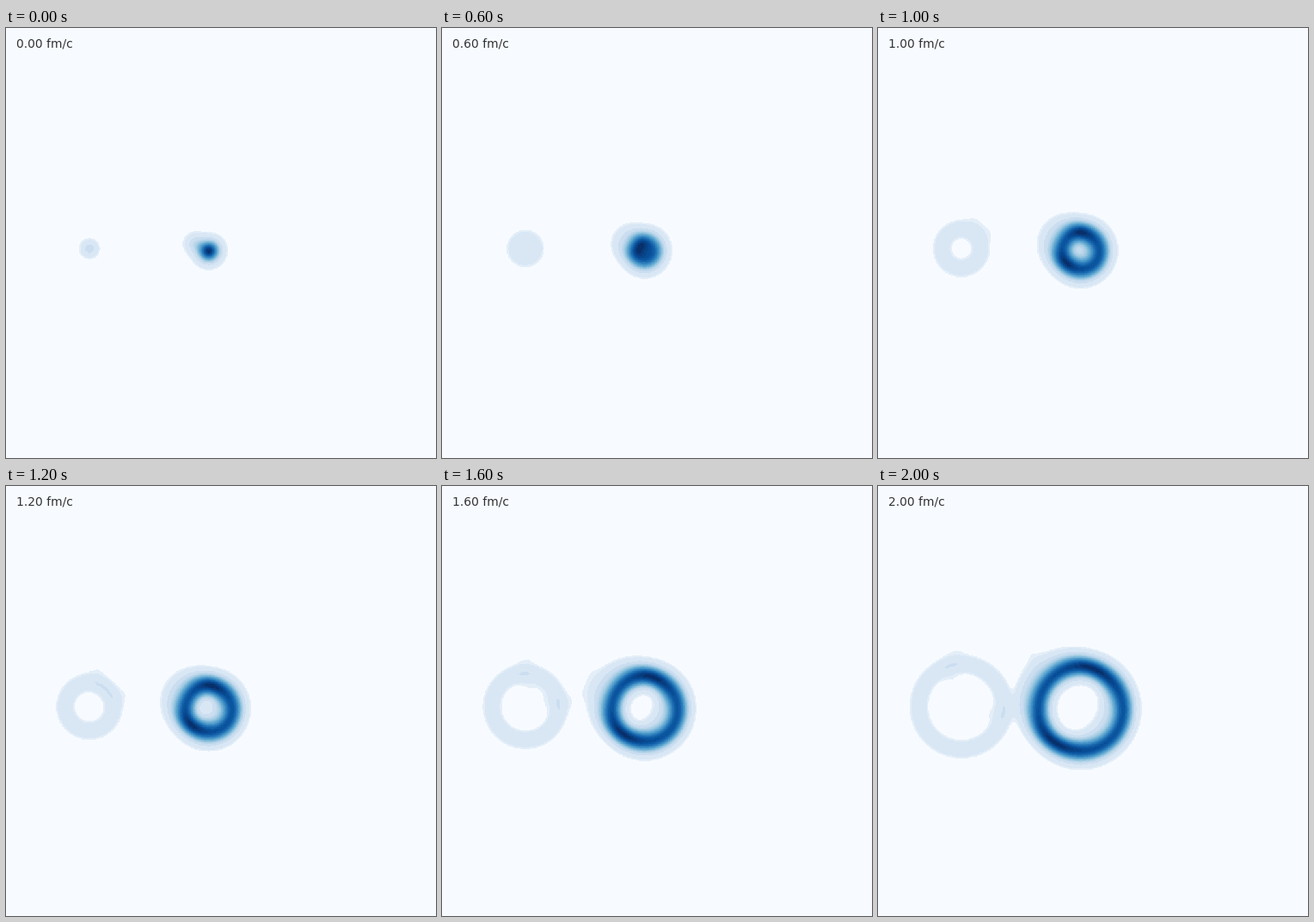
Animation of 500x500 px, one loop 2100 ms. Source, as a matplotlib script:

```python
import numpy as np
import matplotlib.pyplot as plt
from matplotlib.animation import FuncAnimation
from matplotlib.colors import BoundaryNorm, ListedColormap

SIZE = 500
CELLS = 200
FRAMES = 21
DT = 0.1          # fm/c per frame
SPEED = 26.75     # px per fm/c
LAG = 3.8         # px lost while the front builds up

# x, y, amplitude, width of each hot spot (px)
SPOTS = [
    (235.7, 259.8, 1.00, 8.3),
    (220.3, 251, 0.22, 7.4),
    (242, 254, 0.08, 7),
    (97, 256.5, 0.225, 6.2),
    (134, 215.5, 0.031, 8.3),
]

axis = (np.arange(CELLS) + 0.5) * SIZE / CELLS
X, Y = np.meshgrid(axis, axis)


def front(t):
    return np.hypot(SPEED * t, LAG) - LAG


def ring(x, y, amp, width, radius):
    """Gaussian spot smeared evenly around a circle."""
    r = np.hypot(X - x, Y - y)
    k = r * radius / width**2
    return amp * np.exp(-((r - radius) / width) ** 2 / 2) * np.i0(k) * np.exp(-k)


def density(t):
    radius = front(t)
    total = sum(ring(*spot, radius) for spot in SPOTS)
    return total / total.max()


# Coarse steps in the pale range, fine ones above
bounds = np.r_[0, 0.03, 0.05, 0.153, np.linspace(0.24, 1.0001, 25)]
shades = np.r_[0, 0.095, 0.15, 0.22, (bounds[4:-1] + bounds[5:]) / 2]
shades[-1] = 1
cmap = ListedColormap(plt.cm.Blues(shades))
norm = BoundaryNorm(bounds, cmap.N)

fig = plt.figure(figsize=(5, 5), dpi=100, facecolor=cmap(0))
ax = fig.add_axes([0, 0, 1, 1])
ax.axis("off")
image = ax.imshow(density(0), cmap=cmap, norm=norm, interpolation="hanning",
                  extent=(0, SIZE, SIZE, 0), aspect="auto")
label = fig.text(12 / SIZE, 1 - 23 / SIZE, "", fontsize=10,
                 family="DejaVu Sans", color="#333333")


def update(i):
    t = i * DT
    image.set_data(density(t))
    label.set_text(f"{t:.2f} fm/c")
    return image, label


anim = FuncAnimation(fig, update, frames=FRAMES, interval=100,
                     repeat=True, repeat_delay=0)
plt.show()
```
